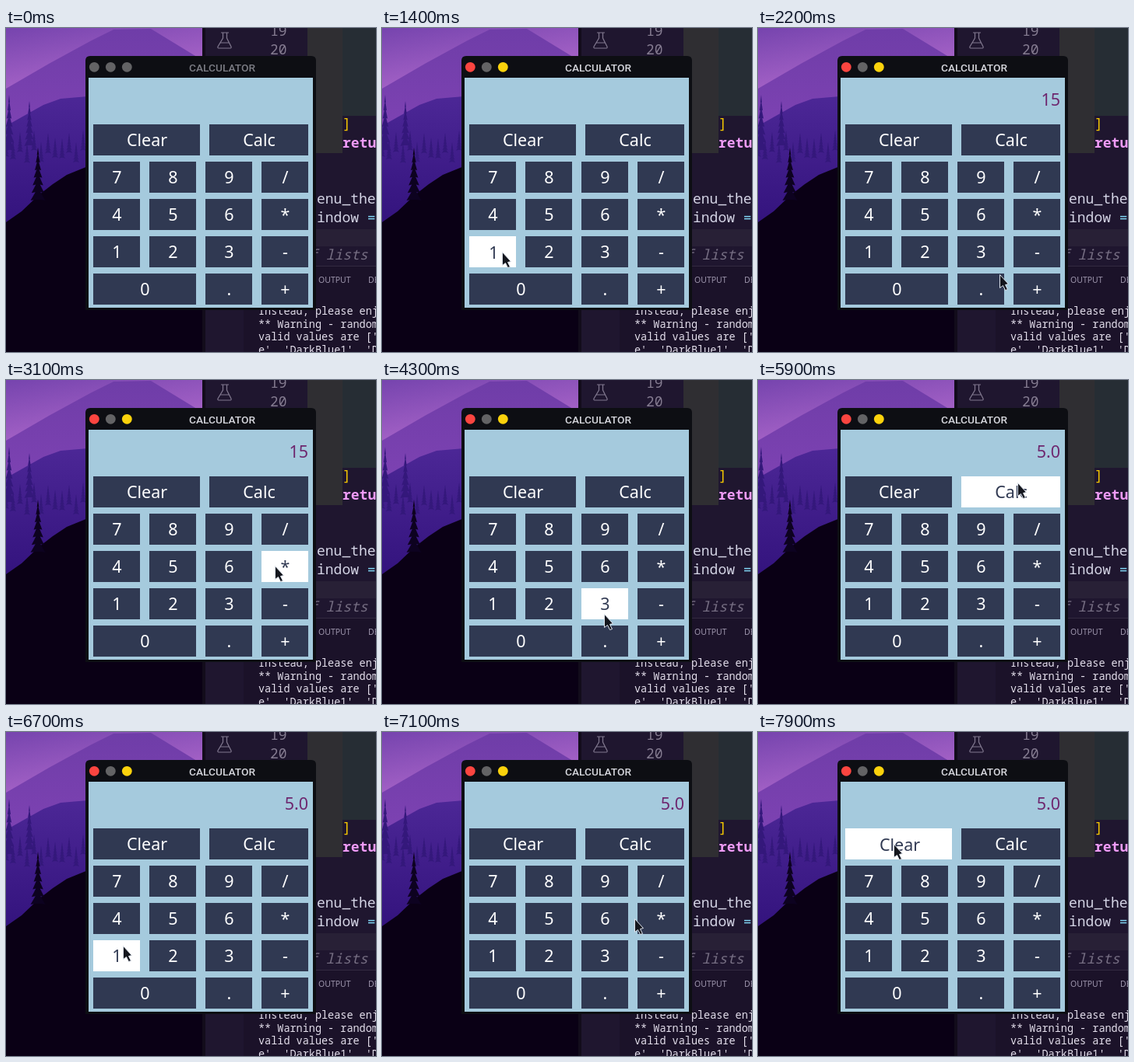
An HTML page that plays this animation: 475x417 px, repeating every 8 s.

```html
<!DOCTYPE html>
<html lang="en">
<head>
<meta charset="utf-8">
<title>Calculator</title>
<style>
  html, body { margin: 0; width: 100%; height: 100%; overflow: hidden; background: #0a0014; }
  svg { display: block; width: 100%; height: 100%; }
  text { white-space: pre; }
  .code { font: 18px "Noto Sans Mono", "DejaVu Sans Mono", monospace; }
  .term { font: 13.5px "Noto Sans Mono", "DejaVu Sans Mono", monospace; fill: #e4dfec; }
  .tab { font: 10.5px "Noto Sans", sans-serif; fill: #9c94ab; }
  .title { font: 500 13.7px Roboto, sans-serif; text-anchor: middle; }
  .key, .display { font: 500 21.5px "Noto Sans", "Open Sans", sans-serif; }
  .key { text-anchor: middle; }
  .display { text-anchor: end; fill: #6e266e; }
</style>
</head>
<body>
<svg viewBox="0 0 475 417" preserveAspectRatio="none">
  <defs>
    <linearGradient id="sky" x2=".4" y2="1">
      <stop offset="0" stop-color="#7644ae"/>
      <stop offset=".6" stop-color="#a05fc4"/>
    </linearGradient>
    <linearGradient id="far" x2="0" y2="1">
      <stop offset="0" stop-color="#6f3da8"/>
      <stop offset="1" stop-color="#8545b8"/>
    </linearGradient>
    <linearGradient id="mid" x2="0" y2="1">
      <stop offset="0" stop-color="#4c2796"/>
      <stop offset="1" stop-color="#32127c"/>
    </linearGradient>
  </defs>

  <rect width="253" height="110" fill="url(#sky)"/>
  <path d="M0 78L55 46 108 17 138 2 186 1 253 42V200H0Z" fill="url(#far)"/>
  <path d="M0 126L48 99 70 91 105 88V260H0Z" fill="url(#mid)"/>
  <g id="trees" fill="#34187b"></g>
  <path d="M0 250L20 236 42 215 60 201 78 189 105 178H253V417H0Z" fill="#0a0015"/>
  <g id="tall" fill="#0d0220"></g>

  <rect x="253" width="222" height="417" fill="#1f162f"/>
  <rect x="252" width="4" height="417" fill="#120c1b"/>
  <rect x="387" width="45" height="161" fill="#2f2e32"/>
  <rect x="432" width="43" height="113" fill="#262d34"/>
  <rect x="387" y="259" width="88" height="22" fill="#282036"/>
  <rect x="305" y="306" width="170" height="111" fill="#1b1229"/>
  <path d="M305 306.500H475" stroke="#332a40"/>
  <path d="M276 6H286M278.500 6V13L272 24Q271.500 26 273 26H288Q289.500 26 289 24L283.500 13V6M275.500 19H286"
        fill="none" stroke="#81788f" stroke-width="1.2"/>
  <g class="code">
    <g fill="#857c91"><text x="339" y="10">19</text><text x="339" y="34">20</text></g>
    <text x="432" y="129" fill="#f5c800">]</text>
    <text x="432" y="153.500" fill="#f09cf8" font-weight="700">retu</text>
    <g fill="#d3d3e4">
      <text x="399" y="226">enu_the</text>
      <text x="399" y="250">indow <tspan fill="#82d8f7">=</tspan></text>
    </g>
    <text x="389" y="298" fill="#756d82" font-style="italic">f lists</text>
  </g>
  <text class="tab" x="401" y="328">OUTPUT</text>
  <text class="tab" x="465" y="328">DEBUG</text>
  <g class="term" id="term"></g>

  <path d="M102 363V42Q102 36 108 36H392Q398 36 398 42V363Z" fill="#0d0e13"/>
  <g id="dots"></g>
  <text class="title" id="title" x="277.5" y="55.5">CALCULATOR</text>
  <rect x="106" y="64" width="288" height="296" fill="#a5cadd"/>
  <text class="display" id="display" x="388" y="100"></text>
  <g id="keys"></g>
  <path id="cursor" d="M0 0V17L4 14 7 20 10 19 7 13 11 12Z"
        fill="#14161d" stroke="#dde3ec" stroke-linejoin="round"/>
</svg>
<script>
const LOOP = 8000, STEP = 100, FOCUS = 1400;
const NAVY = "#303952", GREY = "#636365", KEY_H = 40;
const $ = id => document.getElementById(id);

function add(parent, tag, attrs, text = "") {
  const el = document.createElementNS("http://www.w3.org/2000/svg", tag);
  for (const k in attrs) el.setAttribute(k, attrs[k]);
  el.textContent = text;
  parent.append(el);
  return el;
}

// A fir: tiers of branches that widen towards the ground.
function fir(parent, x, top, height, width) {
  const tiers = 7;
  let left = "", right = "";
  for (let i = 1; i <= tiers; i++) {
    const y = top + height * i / tiers, w = width * i / tiers / 2;
    right += `L${x + w} ${y}L${x + w * .4} ${y - 1}`;
    left = `L${x - w * .4} ${y - 1}L${x - w} ${y}` + left;
  }
  add(parent, "path", { d: `M${x} ${top}${right}${left}Z` });
}
fir($("trees"), 4, 86, 72, 15);
fir($("trees"), 30, 94, 58, 13);
for (let x = 0; x < 105; x += 9)
  fir($("trees"), x, 140 + 8 * Math.sin(x), 26, 8);
fir($("tall"), 41, 154, 68, 19);

["Instead, please enj", "** Warning - random", "valid values are ['", "e', 'DarkBlue1', 'D"]
  .forEach((line, i) => add($("term"), "text", { x: 324, y: 369 + 16.6 * i }, line));

const dots = ["#fb4540", GREY, "#fbd20c"].map((color, i) =>
  ({ color, el: add($("dots"), "circle", { cx: 113.3 + 21 * i, cy: 50.3, r: 6.4 }) }));

const keys = {};
function addKey(label, x, y, w = 60) {
  const box = add($("keys"), "rect", { x, y, width: w, height: KEY_H });
  const text = add($("keys"), "text", { class: "key" }, label);
  keys[label] = { x, y, w, cx: x + w / 2, cy: y + KEY_H / 2, box, text };
}
addKey("Clear", 112, 124, 137);
addKey("Calc", 261, 124, 127);
["789/", "456*", "123-"].forEach((row, r) =>
  [...row].forEach((label, c) => addKey(label, 112 + 72 * c, 172 + 48 * r)));
addKey("0", 112, 316, 132);
addKey(".", 256, 316);
addKey("+", 328, 316);

// The session: where the pointer goes, as offsets from key centres, and what it presses.
const moves = [], presses = [];
const go = (from, to, label, dx = 0, dy = 0) =>
  moves.push({ from, to, x: keys[label].cx + dx, y: keys[label].cy + dy });
const press = (from, to, label) => presses.push({ from, to, label });

go(200, 500, "1");
go(1000, 1200, "1", 12);
press(1400, 1500, "1");
go(1500, 1700, "5");
press(1700, 1800, "5");
go(1800, 2200, ".", 24, -19);
go(2200, 2400, "+", -19, -8);
go(2600, 2700, "+");
go(2800, 3100, "*", -13, -1);
go(3100, 3600, "/", -6, -4);
press(3600, 3800, "/");
go(3700, 4300, "3", -1, 13);
go(4300, 4500, "3", -3, 4);
press(4500, 4700, "3");
go(4600, 5100, "5", 0, -94);
go(5100, 5800, "Calc", 8, -12);
press(5800, 5900, "Calc");
go(6300, 6700, "1", 8, -13);
go(6700, 7100, "6", 38);
go(7100, 7200, "Calc", 8, -8);
go(7200, 7500, "Clear", -26, -11);
go(7600, 7800, "Clear", -7);
press(7900, LOOP, "Clear");

function pointer(t) {
  let x = 72, y = 296;
  for (const m of moves) {
    if (t < m.from) break;
    const k = Math.min(1, (t - m.from) / (m.to - m.from));
    x += (m.x - x) * k;
    y += (m.y - y) * k;
  }
  return t < moves[0].from ? [-50, -50] : [Math.round(x), Math.round(y)];
}

// What the calculator shows after every press released by time t.
function reading(t) {
  let entry = "", stored = 0;
  for (const { to, label } of presses) {
    if (t < to) break;
    if (label === "/") { stored = Number(entry); entry = ""; }
    else if (label === "Calc") entry = (stored / entry).toFixed(1);
    else if (label === "Clear") entry = "";
    else entry += label;
  }
  return entry;
}

function draw(ms) {
  const t = Math.floor(ms % LOOP / STEP) * STEP;
  const [x, y] = pointer(t);
  const hotY = y - 2;
  const focused = t >= FOCUS;
  const held = presses.find(p => t >= p.from && t < p.to);

  for (const { el, color } of dots) el.setAttribute("fill", focused ? color : GREY);
  $("title").setAttribute("fill", focused ? "#d5d6dc" : "#7b7c84");
  $("display").textContent = reading(t);

  for (const [label, k] of Object.entries(keys)) {
    const hover = x >= k.x && x < k.x + k.w && hotY >= k.y && hotY < k.y + KEY_H;
    const shift = held && held.label === label ? 1 : 0;
    k.box.setAttribute("fill", hover ? "#fff" : NAVY);
    k.text.setAttribute("fill", hover ? NAVY : "#fff");
    k.text.setAttribute("x", k.cx + .5 + shift);
    k.text.setAttribute("y", k.cy + 8 + shift);
  }
  $("cursor").setAttribute("transform", `translate(${x + .5} ${y + .5})`);
}

const start = performance.now();
function tick() {
  draw(performance.now() - start);
  requestAnimationFrame(tick);
}
tick();
</script>
</body>
</html>
```
